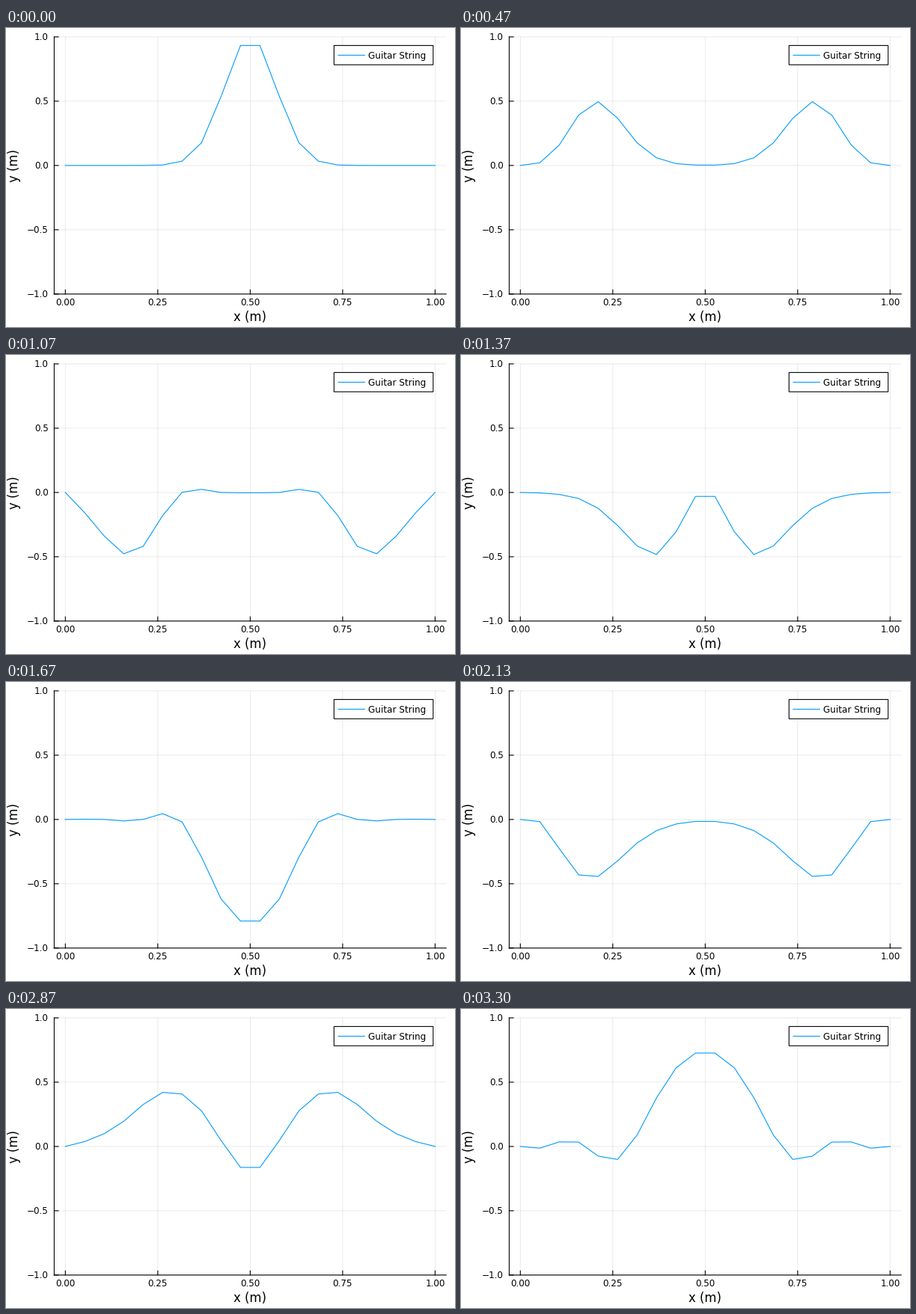
Write a matplotlib script that moves like this. It is 600 px wide and 400 px high and loops after 3.33 s.

```python
import numpy as np
import matplotlib.pyplot as plt
from matplotlib.animation import FuncAnimation

WIDTH, HEIGHT, DPI = 600, 400, 100
PT = 72 / DPI                      # points per pixel
FRAMES, INTERVAL = 100, 33.3
BLUE = "#009AFA"

LEFT, RIGHT, TOP, BOTTOM = 64.4, 588.2, 11.9, 355.9
X0, X1 = 79.3, 573.4

plt.rcParams["font.family"] = "DejaVu Sans"
plt.rcParams["path.snap"] = False

# Wave equation on linear finite elements, trapezoidal time steps.
CELLS = 19
DURATION = 2.0
nodes = np.linspace(0, 1, CELLS + 1)
modes = np.arange(1, CELLS)
shapes = np.sin(np.pi * np.outer(nodes, modes))
pluck = np.exp(-100 * (nodes - 0.5) ** 2)
amps = 2 / CELLS * shapes.T @ pluck

cos_k = np.cos(np.pi * modes / CELLS)
omega = CELLS * np.sqrt(6 * (1 - cos_k) / (2 + cos_k))
dt = DURATION / (FRAMES - 1)
phase_step = 2 * np.arctan(omega * dt / 2)


def string_at(step):
    return shapes @ (amps * np.cos(phase_step * step))


def px(x):
    return X0 + (X1 - X0) * x


def py(y):
    return (TOP + BOTTOM) / 2 - (BOTTOM - TOP) / 2 * y


fig = plt.figure(figsize=(WIDTH / DPI, HEIGHT / DPI), dpi=DPI, facecolor="white")
ax = fig.add_axes([0, 0, 1, 1])
ax.set_xlim(0, WIDTH)
ax.set_ylim(HEIGHT, 0)
ax.axis("off")


def line(xs, ys, color="black", width=1.1, **kw):
    return ax.plot(xs, ys, color=color, lw=width * PT, **kw)[0]


def label(x, y, text, size=12, ha="center", **kw):
    ax.text(x, y, text, fontsize=size * PT, ha=ha, va="baseline", **kw)


TICK = 5.6
for v in np.linspace(0, 1, 5):
    x = px(v)
    line([x, x], [TOP, BOTTOM], width=0.8, alpha=0.1)
    line([x, x], [BOTTOM, BOTTOM - TICK])
    label(x, 371.2, f"{v:.2f}")

for v in np.linspace(-1, 1, 5):
    y = py(v)
    line([LEFT, RIGHT], [y, y], width=0.8, alpha=0.1)
    line([LEFT, LEFT + TICK], [y, y])
    label(56.6, y + 4.4, f"{v:.1f}".replace("-", "\u2212"), ha="right")

line([LEFT, LEFT], [TOP, BOTTOM])
line([LEFT, RIGHT], [BOTTOM, BOTTOM])
label(326.4, 392, "x (m)", size=16.5)
label(16, py(0), "y (m)", size=16.5, rotation=90, rotation_mode="anchor")

string = line(px(nodes), py(string_at(0)), BLUE, solid_joinstyle="miter")

# Legend
ax.add_patch(plt.Rectangle((438.3, 23.4), 132.5, 25.8, facecolor="white",
                           edgecolor="black", lw=1.1 * PT, zorder=4))
line([444, 479.3], [36.4, 36.4], BLUE, zorder=5)
label(484, 40.8, "Guitar String", ha="left", zorder=5)


def update(step):
    string.set_ydata(py(string_at(step)))
    return (string,)


anim = FuncAnimation(fig, update, frames=FRAMES, interval=INTERVAL,
                     repeat=True, repeat_delay=0, blit=False)
plt.show()
```
